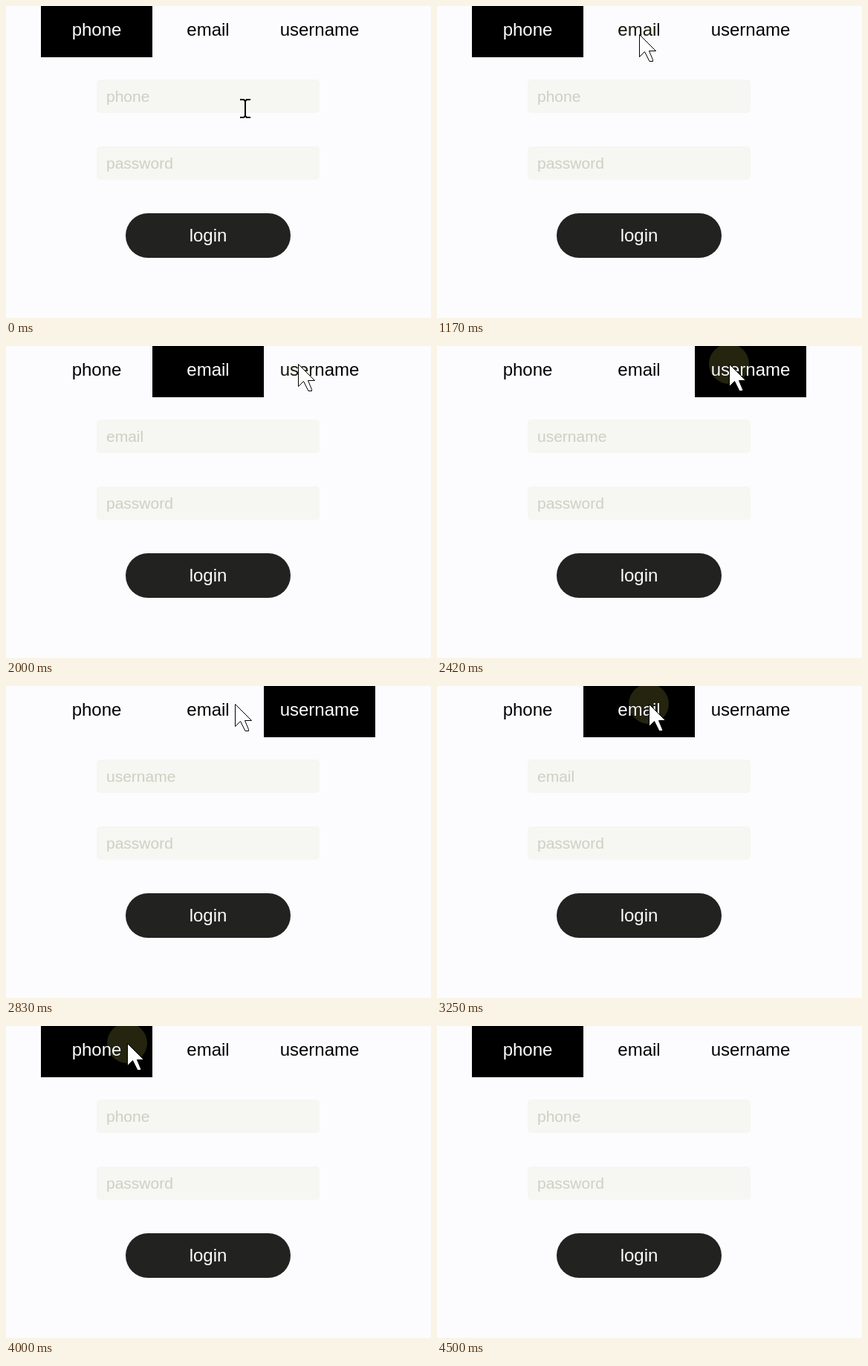
Animation, 572 px wide and 420 px high, one loop 5.01 s. Source, as an HTML page:

```html
<!DOCTYPE html>
<html lang="en">
<head>
<meta charset="utf-8">
<title>Login tabs</title>
<style>
  html, body { margin: 0; width: 100%; height: 100%; overflow: hidden; background: #fcfcfe; }
  svg { display: block; width: 572px; height: 420px; isolation: isolate; }
  text { font: 24px "Liberation Sans", Arial, sans-serif; }
  .tab, .login { text-anchor: middle; }
  .tab.active, .login { fill: #fff; }
  .field { fill: #f6f6f2; }
  .hint { font-size: 21px; fill: #cfcfc4; }
  .button { fill: #222220; }
  #ripple { fill: #24240f; mix-blend-mode: lighten; }
  #arrow { fill: #fff; stroke: #000; }
  #beam { fill: none; stroke: #000; stroke-width: 2; }
</style>
</head>
<body>
<svg viewBox="0 0 572 420">
  <rect width="572" height="420" fill="#fcfcfe"/>
  <rect id="marker" width="150" height="69"/>
  <text class="tab" x="122" y="40">phone</text>
  <text class="tab" x="272" y="40">email</text>
  <text class="tab" x="422" y="40">username</text>

  <rect class="field" x="122" y="99" width="300" height="45" rx="5"/>
  <text class="hint" id="hint" x="135" y="129">phone</text>
  <rect class="field" x="122" y="189" width="300" height="45" rx="5"/>
  <text class="hint" x="135" y="219">password</text>

  <rect class="button" x="161" y="279" width="222" height="60" rx="30"/>
  <text class="login" x="272" y="317">login</text>

  <circle id="ripple" r="27"/>
  <path id="arrow" d="M.5 .5V30.5L7.5 23.5 14 36.5H18.5V34.5L13.5 22.5H22.5Z"/>
  <path id="beam" d="M-7-12H-2L0-10 2-12H7M0-10V10M-7 12H-2L0 10 2 12H7"/>
</svg>
<script>
  const LOOP = 5010;
  const TICK = 1000 / 12; // the screen refreshes twelve times a second
  const EXIT_TICK = 54;
  const RIPPLE_TAIL = 2;
  const FIELD_TOP = 99;

  // The cursor travels to each stop, presses on arrival and picks a tab on release.
  const home = { x: 322, y: 138 };
  const stops = [
    { leave: 5, arrive: 12, release: 15, x: 272, y: 38, bow: 14, tab: 1 },
    { leave: 16, arrive: 24, release: 29, x: 393, y: 24, bow: 25, tab: 2 },
    { leave: 30, arrive: 37, release: 39, x: 285, y: 24, bow: 0, tab: 1 },
    { leave: 39, arrive: 45, release: 47, x: 163, y: 23, bow: 0, tab: 0 },
    { leave: 48, arrive: 53, x: 491, y: 374, bow: 0 }
  ];

  const [marker, hint, ripple, arrow, beam] =
    ["marker", "hint", "ripple", "arrow", "beam"].map(id => document.getElementById(id));
  const tabs = [...document.querySelectorAll(".tab")];

  const easeOut = k => 1 - (1 - k) ** 1.85;

  function cursorAt(tick) {
    const index = stops.findLastIndex(stop => stop.leave <= tick);
    if (index < 0) return home;
    const from = stops[index - 1] || home;
    const to = stops[index];
    const k = easeOut(Math.min(1, (tick - to.leave) / (to.arrive - to.leave)));
    const dx = to.x - from.x;
    const dy = to.y - from.y;
    const bend = to.bow * Math.sin(Math.PI * k) / Math.hypot(dx, dy);
    return {
      x: Math.round(from.x + dx * k - dy * bend),
      y: Math.round(from.y + dy * k + dx * bend)
    };
  }

  function show(node, visible) {
    node.setAttribute("visibility", visible ? "visible" : "hidden");
  }

  function selectTab(active) {
    marker.setAttribute("x", 47 + 150 * active);
    tabs.forEach((tab, i) => tab.classList.toggle("active", i === active));
    hint.textContent = tabs[active].textContent;
  }

  function draw() {
    const tick = Math.floor((performance.now() % LOOP + 4) / TICK);
    const { x, y } = cursorAt(tick);
    const onScreen = tick < EXIT_TICK;
    const overField = tick < stops[0].arrive && y >= FIELD_TOP;
    const clicked = stops.findLast(stop => stop.release <= tick);

    selectTab(clicked ? clicked.tab : 0);
    for (const node of [ripple, arrow, beam]) {
      node.setAttribute("transform", `translate(${x} ${y})`);
    }
    show(ripple, stops.some(s => tick >= s.arrive && tick < s.release + RIPPLE_TAIL));
    show(arrow, onScreen && !overField);
    show(beam, onScreen && overField);
    requestAnimationFrame(draw);
  }
  draw();
</script>
</body>
</html>
```
